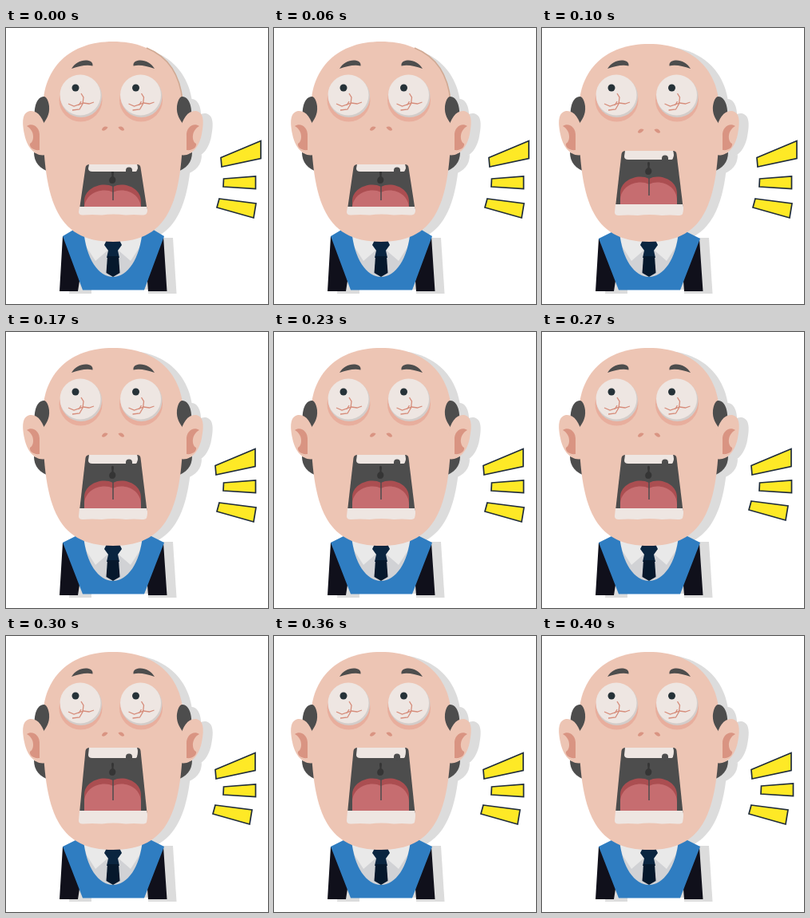
An HTML page for the animation above (0.5 s loop, 328 by 346 pixels).

```html
<!DOCTYPE html>
<html>
<head>
<meta charset="utf-8">
<style>
html, body { margin: 0; width: 100%; height: 100%; overflow: hidden; background: #fff }
svg { display: block; width: 100vw; height: 100vh }
</style>
</head>
<body>
<svg viewBox="0 0 328 346">
  <defs>
    <path id="skull" d="M134 20C80 20 46 52 46 104C46 215 61 268 134 268C207 268 222 215 222 104C222 52 188 20 134 20Z"/>
    <path id="ear" d="M50 128C47 113 40 103 30 104C20 106 20 118 23 133C26 149 36 162 50 159Z"/>
    <path id="tuft" d="M48 86C39 85 33 100 37 119L46 121C50 115 55 109 54 98C53 91 51 87 48 86Z"/>
    <path id="patch" d="M35 156L56 160V181C42 177 35 168 35 156Z"/>
    <g id="side">
      <use href="#tuft" fill="#4d4d4d"/>
      <use href="#ear" fill="#edc5b4"/>
      <path fill="#d99482" d="M26 123C33 118 43 124 42 136V153C34 154 29 149 30 145C36 142 36 128 26 123Z"/>
    </g>
    <path id="brow" fill="#4d4d4d" d="M82 51C86 44 94 40 101 40.500C106 41 109 43 108.500 47.500C100 45.500 92 48 82 51Z"/>
    <path id="nostril" fill="#d99482" d="M120 131C120 127 125 125 127.500 127.500C126 130 123 133 120 131Z"/>
    <g id="eye">
      <circle cx="93.500" cy="90.500" r="27" fill="#e8ae9d"/>
      <circle cx="94" cy="86" r="26" fill="#d3cdca"/>
      <circle cx="93" cy="84" r="25.500" fill="#eee6e2"/>
      <circle cx="87" cy="75" r="4.500" fill="#263238"/>
      <path fill="none" stroke="#d68c7a" stroke-width="1.300" d="M78 95L85 98L97 94L104 95L110 93M94 82L97 87L96 95L92 102L83 103M91 97L94 92"/>
    </g>
  </defs>

  <g fill="#dcdcdc">
    <g transform="translate(12 3)">
      <use href="#skull"/>
      <g transform="matrix(-1 0 0 1 268 0)">
        <use href="#tuft"/>
        <use href="#ear"/>
        <use href="#patch"/>
      </g>
    </g>
    <path d="M84 263H209L213.500 333H79Z"/>
  </g>
  <path fill="#fff" d="M107 328H178V334H107Z"/>

  <path fill="#d1d2d5" d="M92 250H176L166 316H104Z"/>
  <path fill="#e9e9e9" d="M94 252H174L167 275L156 292L141 279H127L112 292L101 275Z"/>
  <path fill="#0a2540" d="M126 266H142L145 272L140 279L142 288H126L128 279L123 272Z"/>
  <path fill="#06182c" d="M127 286H141L142.500 307L134 312L125.500 307Z"/>
  <path id="jacket" fill="#10101b"/>
  <path id="vest" fill="#2f7dc1"/>

  <g fill="#4d4d4d">
    <use href="#patch"/>
    <use href="#patch" transform="matrix(-1 0 0 1 268 0)"/>
  </g>
  <use id="head" href="#skull" fill="#edc5b4"/>
  <path id="rim" fill="none" stroke="#d0a993" stroke-width="1.500" d="M176 25C203 36 218 58 221 92"/>
  <use href="#side"/>
  <use href="#side" transform="matrix(-1 0 0 1 268 0)"/>
  <use href="#brow"/>
  <use href="#brow" transform="matrix(-1 0 0 1 268 0)"/>
  <use href="#eye"/>
  <use href="#eye" x="75.500"/>
  <g id="nose">
    <use href="#nostril"/>
    <use href="#nostril" transform="matrix(-1 0 0 1 268 0)"/>
  </g>

  <path id="mouth" fill="#4d4d4d"/>
  <path id="back" fill="#ab4e51"/>
  <path id="tongue" fill="#c66d70"/>
  <path id="crease" stroke="#4d4d4d" stroke-width="1.500"/>
  <path id="uvula" fill="#353535" d="M132 -9C132 -12 135 -12 135 -9L134.500 -4C139 -2 138 5 133 5C128 5 128 -2 132.500 -4Z"/>
  <path id="upper" fill="#eee6e2"/>
  <g id="gap" fill="#4d4d4d"><circle r="4"/><path d="M-4 0H4V4H-4Z"/></g>
  <path id="lower" fill="#eee6e2"/>

  <g fill="#fee926" stroke="#202d3b" stroke-width="1.700">
    <path id="ray0" d="M269 162.500L319 141.500V163.500L270 174Z"/>
    <path id="ray1" d="M272.500 189L312.500 186V201.500L272 199Z"/>
    <path id="ray2" d="M267 214L313 220L310 238L264 225Z"/>
  </g>
</svg>
<script>
const el = id => document.getElementById(id);
const path = (id, d) => el(id).setAttribute('d', d);
const move = (id, x, y) => el(id).setAttribute('transform', `translate(${x} ${y})`);

// Mouth opening: half shut, open, wide
const poses = [
  { top: 171, teeth: 9, tongue: 197, tip: 216, gum: 224, chin: 234.5, nose: -3, uvula: 190 },
  { top: 154, teeth: 11, tongue: 187, tip: 210, gum: 221, chin: 235, nose: 0, uvula: 179 },
  { top: 140, teeth: 13, tongue: 179, tip: 206, gum: 219, chin: 235.5, nose: -6, uvula: 170 }
];

const lobes = (y, edge, b) =>
  `M98 ${b}V${edge}C98 ${y + 3} 121 ${y - 5} 134 ${y + 2}C147 ${y - 5} 169 ${y + 3} 169 ${edge}V${b}Z`;

function drawBody(lift) {
  const y = 255 - lift, s = 264 - lift;
  path('jacket', `M71 ${s}L67 330H90L92 317L88 ${s}ZM197 ${s}L201.5 330H178L177 317L184 ${s}Z`);
  path('vest', `M${89 - lift} ${y}L71 ${s}L96 328.5H173L198 ${s}L${180 + lift} ${y}L171 ${y}C168 290 152 312 134 312C116 312 100 290 97 ${y}Z`);
}

function drawMouth({ top, teeth, tongue, tip, gum, chin, nose, uvula }) {
  const bite = top + teeth;
  path('mouth', `M99.5 ${top + 4}Q100 ${top} 105 ${top}H164Q168 ${top} 168.5 ${top + 4}L176.5 ${gum + 3}H92Z`);
  path('back', lobes(tongue, tongue + 20, gum + 3));
  path('tongue', lobes(tongue + 7, tongue + 29, gum + 3));
  path('crease', `M134 ${tongue - 5}V${tip}`);
  path('upper', `M104 ${top}H164Q166 ${top + 5} 164 ${bite - 2}Q164 ${bite} 161 ${bite}H108Q103 ${bite} 103 ${bite - 4}Z`);
  move('gap', 154, bite - 1.5);
  path('lower', `M92 ${gum}H176Q178 ${gum + 5} 176 ${chin - 2}Q175 ${chin} 170 ${chin}Q160 ${chin - 1} 150 ${chin}Q134 ${chin - 2} 120 ${chin}Q108 ${chin - 1} 96 ${chin}Q91 ${chin} 91 ${chin - 4}Z`);
  move('nose', 0, nose);
  move('uvula', 0, uvula);
}

function draw(now) {
  const t = now % 500;
  const raised = t < 100;
  drawBody(raised ? 3 : 0);
  drawMouth(poses[raised ? 0 : t < 300 ? 1 : 2]);
  el('head').setAttribute('transform', raised ? 'matrix(1 0 0 1.012 0 -3.200)' : '');
  el('rim').style.display = raised ? '' : 'none';
  move('ray0', t < 170 ? 0 : -7, t < 170 ? 0 : 5);
  move('ray1', t < 400 ? 0 : 2, t < 400 ? 0 : -1);
  move('ray2', t < 270 ? 0 : -5, t < 270 ? 0 : -2);
}

const start = performance.now();
function tick() {
  draw(performance.now() - start);
  requestAnimationFrame(tick);
}
tick();
</script>
</body>
</html>
```
